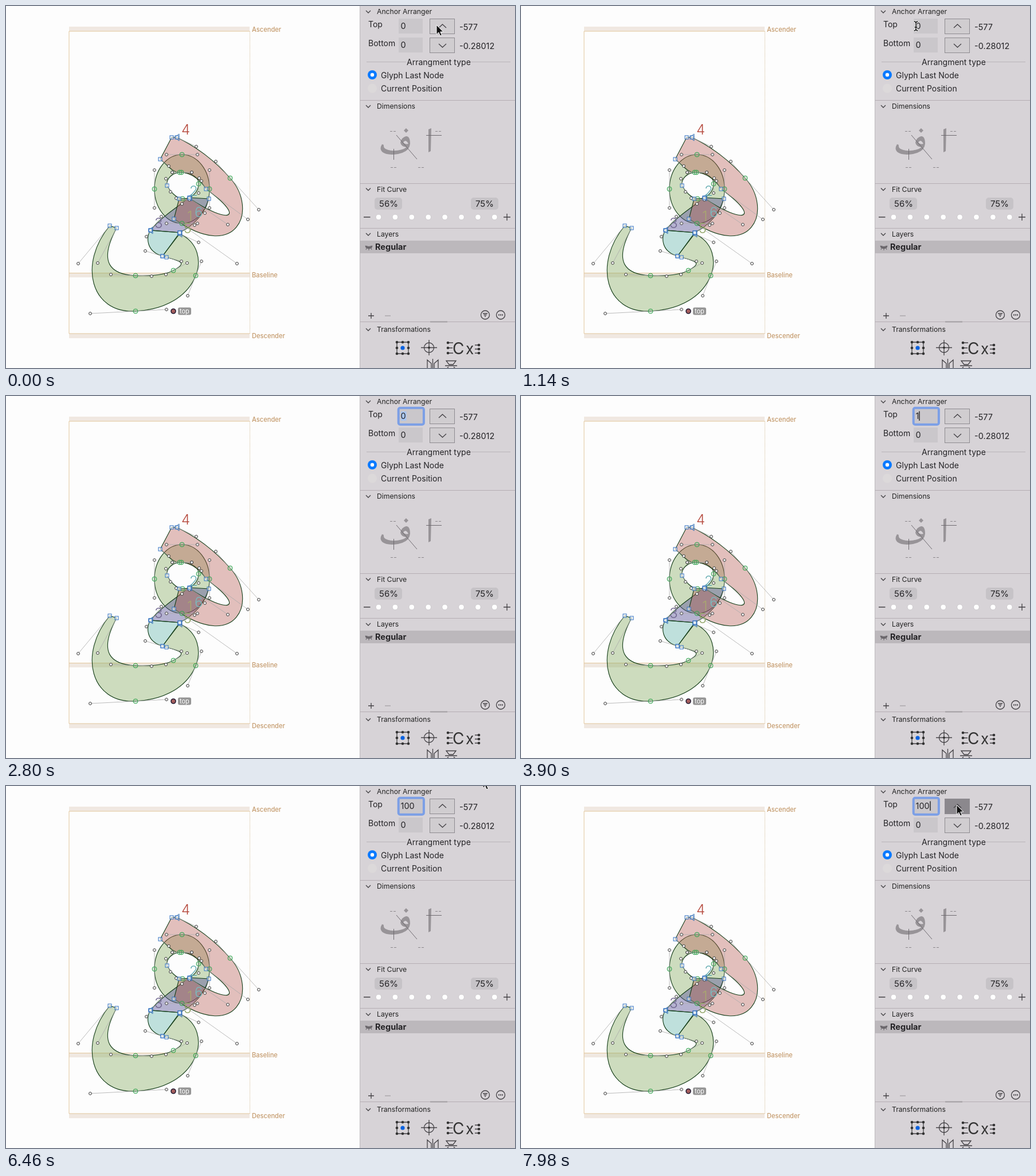
Write an HTML page that moves like this. It is 888 px wide and 631 px high and loops after 8 s.

```html
<!DOCTYPE html>
<html lang="en">
<head>
<meta charset="utf-8">
<title>Anchor Arranger</title>
<style>
html, body { margin: 0; width: 100%; height: 100%; overflow: hidden; background: #fdfdfd; }
svg { display: block; width: 888px; height: 631px; font-family: Inter, "Open Sans", sans-serif; }
.guide { font-size: 11.1px; font-weight: 500; fill: #c49a6c; }
.head { font-size: 12.2px; fill: #222; }
.body { font-size: 14px; fill: #242326; }
.body .value { font-size: 14.5px; }
.glyphs { font-size: 24px; font-weight: 300; }
.ink { fill: none; stroke: #444246; stroke-width: 1.3; }
</style>
</head>
<body>
<svg viewBox="0 0 888 631">
  <rect width="888" height="631" fill="#fdfdfd"/>

  <!-- metrics -->
  <path d="M110 40H425M110 469H425M110 575H425" stroke="#f0e8e1" stroke-width="8"/>
  <path d="M110 571V44H425M110 465.5H425M110 571H425" fill="none" stroke="#e2c69b"/>
  <path d="M425.5 44V571" stroke="#d3bd98" stroke-dasharray="1 1"/>
  <g class="guide">
    <text x="429" y="45">Ascender</text>
    <text x="429" y="473">Baseline</text>
    <text x="429" y="579">Descender</text>
  </g>

  <!-- glyph -->
  <g id="fills" stroke="#143d18" stroke-width="1.1" fill-rule="evenodd"></g>
  <g id="levers" stroke="#aaa" stroke-width=".8"></g>
  <g id="nodes"></g>
  <g class="glyphs">
    <text x="306" y="224" fill="#b5483c">4</text>
    <text x="320" y="331" fill="#67aeb3">2</text>
    <text x="259" y="387" fill="#716791">3</text>
    <text x="316" y="375" fill="#a9a76f">1</text>
    <text x="329" y="368" fill="#7bb9bd">6</text>
    <text x="310" y="396" fill="#91a667">5</text>
  </g>
  <circle cx="292" cy="532" r="4" fill="#a45d5d" stroke="#201a30" stroke-width="1.6"/>
  <rect x="300" y="525.5" width="23" height="13" rx="3" fill="#969696"/>
  <text x="303" y="535.5" font-size="11" fill="#fff">top</text>

  <!-- panel -->
  <rect x="617" width="271" height="631" fill="#d7d3d7"/>
  <path d="M617.5 0V631" stroke="#bdb9bd"/>
  <path d="M618 164.5H888M618 309.5H888M618 387.5H888M618 550.5H888" stroke="#b5aeb4"/>
  <path d="M740 550.5H770" stroke="#a19da1" stroke-width="2"/>
  <rect x="618" y="409" width="270" height="22" fill="#bcb8bc"/>
  <g id="heads"></g>

  <!-- anchor arranger -->
  <path d="M629 97.5H698M811 97.5H880" stroke="#b9b4b9"/>
  <circle cx="639" cy="120" r="8" fill="#0a7aff"/>
  <circle cx="639" cy="120" r="3.2" fill="#fff"/>
  <circle cx="639" cy="143.5" r="8" fill="#dcd9da"/>
  <rect x="685" y="22" width="42" height="26" fill="#cac7cb"/>
  <rect x="685" y="55" width="42" height="26" fill="#cac7cb"/>
  <rect id="ring" fill="none" stroke="#7c9fe6"/>
  <rect id="mark" x="689" y="27" width="9.5" height="16" fill="#a9c6f2"/>
  <path id="caret" d="M0 26.5V43" stroke="#111" stroke-width="1.3"/>
  <g class="body">
    <text x="632" y="36.5">Top</text>
    <text x="632" y="69.5">Bottom</text>
    <text id="value" class="value" x="688.5" y="40"></text>
    <text class="value" x="688.5" y="73">0</text>
    <text class="value" x="791" y="42">-577</text>
    <text class="value" x="791" y="75">-0.28012</text>
    <text x="699" y="102.5">Arrangment type</text>
    <text x="654" y="125.5">Glyph Last Node</text>
    <text x="654" y="148.5">Current Position</text>
    <text class="value" x="644" y="425" font-weight="700">Regular</text>
  </g>
  <g stroke="#8e8b90" fill="#d0cdd0">
    <rect id="up" x="739.5" y="22.5" width="43" height="26"/>
    <rect x="739.5" y="55.5" width="43" height="26"/>
  </g>
  <path class="ink" d="M755 38L761.5 32L768 38M755 66L761.5 72L768 66"/>

  <!-- dimensions -->
  <g fill="#989498">
    <path fill-rule="evenodd" d="M656 241Q651 249 656 254Q664 261 684 258Q704 254 705 240Q705 227 698 227Q690 229 688 238Q689 245 699 246Q690 253 672 252Q657 250 659 242ZM693 238Q697 231 702 240Q697 242 693 238Z"/>
    <path d="M698 213L702 217L698 221L694 217ZM737 215L742 213L741 253L737 255Z"/>
  </g>
  <path d="M733 225.5H760M676.5 249V268M681 225L717 267" stroke="#6f6b70"/>
  <path d="M670 218.5H680M749 218.5H759M671 281.5H681M719 281.5H729" stroke="#8c888c" stroke-dasharray="4 2"/>

  <!-- fit curve -->
  <rect x="643" y="334" width="48" height="21" rx="5" fill="#c6c3c7"/>
  <rect x="811" y="334" width="48" height="21" rx="5" fill="#c6c3c7"/>
  <text x="651" y="349.5" font-size="15" fill="#242326">56%</text>
  <text x="819" y="349.5" font-size="15" fill="#242326">75%</text>
  <g id="dots" fill="#fff" stroke="#bdb9bd" stroke-width=".6"></g>
  <path class="ink" d="M624 368H635.5M868 368H880M874 362V374"/>

  <!-- layers -->
  <path d="M627 418Q633 421 639 418L638 421Q633 425 628 421ZM629 422L628 425M633 423V426M637 422L638 425" fill="#6a666b" stroke="#6a666b"/>
  <g class="ink">
    <path d="M632 540H642M637 535V545"/>
    <path d="M661 540H671" stroke="#a5a1a5"/>
    <circle cx="836" cy="538.5" r="7.5"/>
    <circle cx="863" cy="538.5" r="7.5"/>
    <path d="M832 536H840M833.5 538.5H838.5M835 541H837"/>
    <path d="M859 538.5H867" stroke-width="2" stroke-dasharray="2 1"/>
  </g>

  <!-- transformations -->
  <g class="ink">
    <path d="M682 586H702V606H682Z"/>
    <circle cx="738" cy="595.5" r="8.5"/>
    <path d="M738 582V609M724 595.5H752M771 587H780M771 596H779M771 605H780M818 591H825M818 598H825M818 605H825"/>
    <path d="M735 632V617L742 623V632M744.5 615V632M754 632V617L747 623V632M768 618.5H785L780 625H773ZM766 627H787M772 629L769 632M781 629L784 632"/>
  </g>
  <g id="grips" fill="#333"></g>
  <circle cx="692" cy="596" r="3.6" fill="#0a62e0"/>
  <circle cx="738" cy="595.5" r="2" fill="#333"/>
  <g font-size="28" fill="#333"><text x="779" y="606.5">C</text><text x="802" y="606.5" font-size="26">x</text></g>

  <!-- pointer -->
  <path id="arrow" d="M0 0V16.5L3.8 13L6.5 19L9.3 17.8L6.7 12H11.8Z" fill="#111" stroke="#fff"/>
  <g id="beam" fill="none" stroke-linecap="round">
    <path id="bar" d="M-3-8Q0-8 0-5V5Q0 8-3 8M3-8Q0-8 0-5M0 5Q0 8 3 8M-2 2H2" stroke="#fff" stroke-width="3"/>
    <path d="M-3-8Q0-8 0-5V5Q0 8-3 8M3-8Q0-8 0-5M0 5Q0 8 3 8M-2 2H2" stroke="#111" stroke-width="1.4"/>
  </g>
</svg>
<script>
const $ = id => document.getElementById(id);
const set = (id, attrs) => { for (const k in attrs) $(id).setAttribute(k, attrs[k]); };
const add = (id, markup) => $(id).insertAdjacentHTML('beforeend', markup);
const show = (id, on) => { $(id).style.display = on ? '' : 'none'; };
const dot = ([x, y], r, style = '') => `<circle cx="${x}" cy="${y}" r="${r}" ${style}/>`;

// Outlines; nodes, levers and start marks are derived from them.
const GREEN = '#84ab5f66', PURPLE = '#5a529670', TEAL = '#63b5aa66', RED = '#b4564d5e';
const shapes = [
  [GREEN, `M259 319 C259 286 280 259 307 259 C334 259 355 286 355 319 C355 352 334 379 307 379 C280 379 259 352 259 319 Z
    M306 290 C324 290 337 300 336 310 C336 326 320 338 308 336 C297 335 287 324 281 313 C279 301 290 290 306 290 Z`],
  [GREEN, `M303 397 C336 412 341 445 331 470 C317 505 280 529 226 532 C147 536 126 449 181 383 L193 387
    C160 448 183 468 226 470 C254 471 279 468 292 461 C316 448 306 445 280 438 L273 436 Z`],
  [PURPLE, 'M320 334 L354 336 C347 361 329 382 303 395 L252 391 C271 367 307 345 320 334 Z'],
  [TEAL, 'M252 391 L303 395 L273 436 C243 427 245 402 252 391 Z'],
  [RED, `M298 229 C332 245 366 271 391 300 C441 355 403 449 293 371 L302 336 L320 335
    C387 381 422 372 349 319 C341 305 324 290 303 290 C290 290 284 279 269 267 L289 229 Z`]
];

function drawNode(p, before, after, first) {
  const angle = (a, b) => Math.atan2(b[1] - a[1], b[0] - a[0]);
  const smooth = before && after && Math.cos(angle(before, p) - angle(p, after)) > .96;
  const [x, y] = p;
  if (smooth) return add('nodes', dot(p, 4, 'fill="#5cb46a33" stroke="#35a352"'));
  add('nodes', `<rect x="${x - 3}" y="${y - 3}" width="6" height="6" fill="#fff8" stroke="#2f6fc0"/>`);
  if (first) add('nodes', `<path d="M${x - 4} ${y}l8-6v12z" fill="none" stroke="#3d77b8"/>`);
}

function drawContour(d) {
  const segs = d.match(/[MLC][^MLC]*/g).map(s =>
    s.match(/\d+ \d+/g).map(pair => pair.split(' ').map(Number)));
  if (segs.at(-1).at(-1).join() === segs[0][0].join()) segs[0] = segs.pop();
  segs.forEach((seg, i) => {
    const p = seg.at(-1), next = segs[(i + 1) % segs.length];
    const before = seg[1], after = next[1] && next[0];
    for (const h of [before, after]) if (h) {
      add('levers', `<path d="M${p}L${h}"/>`);
      add('nodes', dot(h, 2.4, 'fill="#fff" stroke="#333"'));
    }
    drawNode(p, before, after, i === 0);
  });
}

for (const [fill, d] of shapes) {
  add('fills', `<path d="${d}" fill="${fill}"/>`);
  d.split('Z').filter(part => part.includes('M')).forEach(drawContour);
}

const heads = { 'Anchor Arranger': 10, 'Dimensions': 175, 'Fit Curve': 319.5, 'Layers': 398, 'Transformations': 564 };
for (const name in heads) add('heads', `<path class="ink" d="M628 ${heads[name] - 2}l4 4l4-4"/>
  <text class="head" x="647" y="${heads[name] + 4.3}">${name}</text>`);
for (let i = 0; i < 8; i++) add('dots', dot([650 + i * 28.9, 368], 4.8));
for (let i = 0; i < 3; i++) {
  for (let j = 0; j < 3; j++) add('grips', dot([682 + i * 10, 586 + j * 10], 2.3));
  add('grips', dot([771, 587 + i * 9], 2.3) + dot([825, 591 + i * 7], 2.3));
}

const FOCUS = 1720, TYPE = 3680, PRESS = 7850;
const moves = [
  { from: 60, to: 480, x: 689, y: 35 },
  { from: 5450, to: 6000, x: 832, y: -13 },
  { from: 6480, to: 6860, x: 760, y: 33 }
];

function pointer(t) {
  let x = 751, y = 33;
  for (const m of moves) {
    const p = Math.min(1, Math.max(0, (t - m.from) / (m.to - m.from)));
    const e = p * p * (3 - 2 * p);
    x += (m.x - x) * e;
    y += (m.y - y) * e;
  }
  return [x, y];
}

function render(t) {
  const [x, y] = pointer(t);
  const visible = t < 2800 || t > 5450;
  const inField = x < 729 && y > 20;
  show('arrow', visible && !inField);
  show('beam', visible && inField);
  set(inField ? 'beam' : 'arrow', { transform: `translate(${x} ${y})` });

  const grow = 8 * Math.max(0, 1 - (t - FOCUS) / 220) ** 2;
  show('ring', t >= FOCUS);
  set('ring', { x: 684.7 - grow, y: 20.7 - grow, width: 44.2 + 2 * grow, height: 29 + 2 * grow,
    rx: 3 + grow / 2, 'stroke-width': 4 + grow / 2, opacity: 1 - grow / 10 });

  const text = t < TYPE ? '0' : '100'.slice(0, 1 + Math.floor((t - TYPE) / 340));
  if ($('value').textContent !== text) $('value').textContent = text;
  show('mark', t >= 1800 && t < TYPE);
  show('caret', t >= TYPE && (t < 4800 || t % 1000 >= 500));
  set('caret', { transform: `translate(${685.5 + 9.5 * text.length} 0)` });
  set('up', { fill: t >= PRESS ? '#8b888d' : '#d0cdd0' });
}

function loop(now) {
  render(now % 8000);
  requestAnimationFrame(loop);
}
render(0);
requestAnimationFrame(loop);
</script>
</body>
</html>
```
